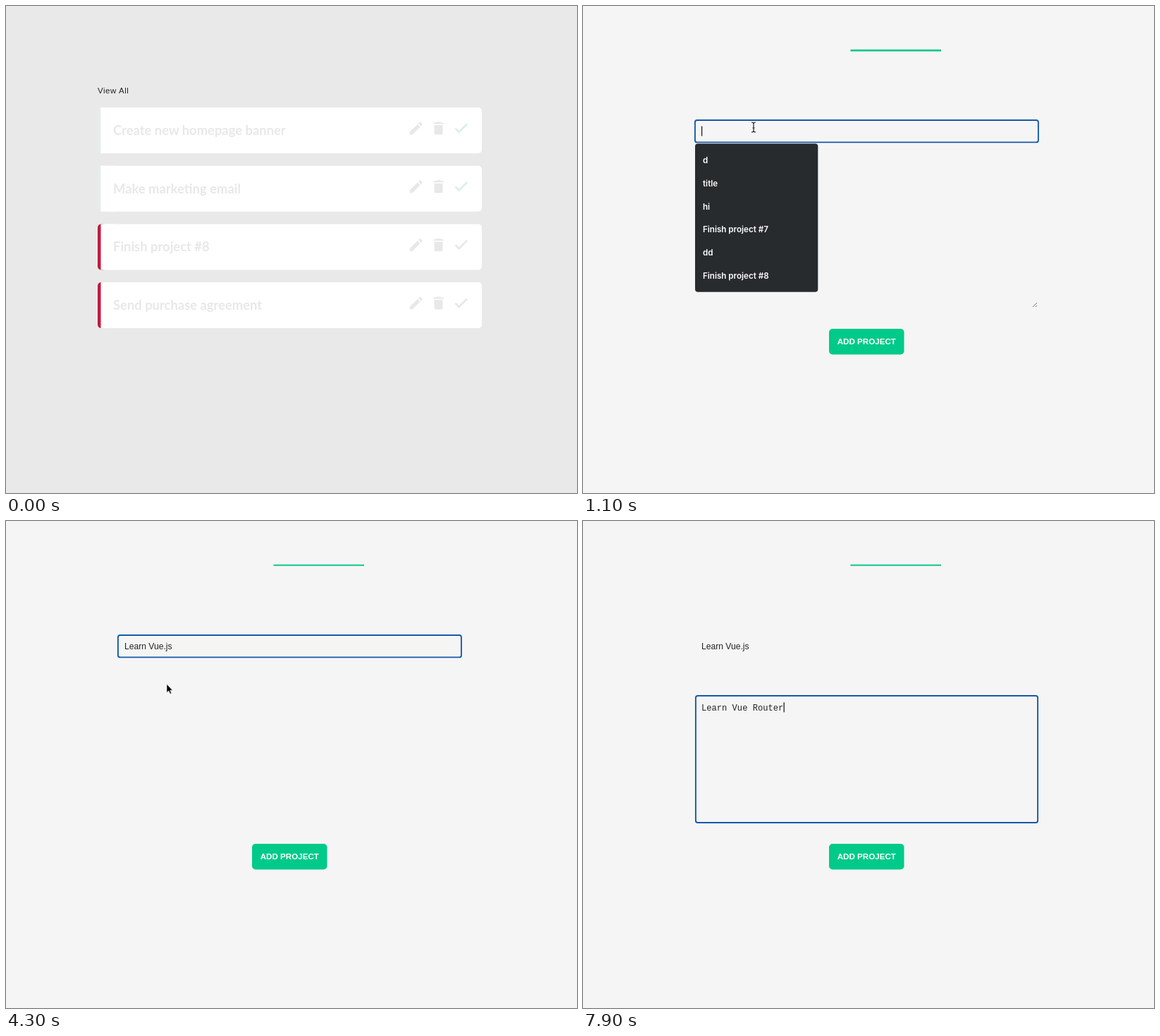
Animation, 810 px wide and 691 px high, one loop 8 s. Source, as an HTML page:

```html
<!DOCTYPE html>
<html lang="en">
<head>
<meta charset="utf-8">
<title>Project planner</title>
<style>
  html, body { margin: 0; width: 100%; height: 100%; overflow: hidden; background: #f5f5f5; }
  svg { display: block; width: 100vw; height: 100vh; }
  text { font-family: "Liberation Sans", Arial, sans-serif; white-space: pre; }
  .card { font: 700 18.4px Lato, sans-serif; fill: #e8e8e8; }
  .label { font-size: 10.9px; fill: #e2e2e2; }
  .option { font: 600 11.6px Inter, sans-serif; fill: #fff; }
  .button { font-size: 11.6px; font-weight: 700; fill: #fff; text-anchor: middle; }
  .field { font-size: 12.12px; fill: #222; }
  .mono { font-family: "Liberation Mono", "Courier New", monospace; }
  .ring { fill: none; stroke: #1559a8; stroke-width: 1.9; }
</style>
</head>
<body>
<svg id="stage" viewBox="0 0 810 691"></svg>
<script>
const LOOP = 8000, STEP = 100;
const stage = document.getElementById('stage');

const rect = (x, y, w, h, fill, r = 0, extra = '') =>
  `<rect x="${x}" y="${y}" width="${w}" height="${h}" rx="${r}" fill="${fill}" ${extra}/>`;
const text = (x, y, cls, str, extra = '') =>
  `<text x="${x}" y="${y}" class="${cls}" ${extra}>${str}</text>`;
const path = (d, x, y, fill, extra = '') =>
  `<path d="${d}" transform="translate(${x} ${y})" fill="${fill}" ${extra}/>`;
const clamp = v => Math.max(0, Math.min(1, v));
const ramp = (t, a, b) => clamp((t - a) / (b - a));
const mix = (a, b, k) => a + (b - a) * k;
const within = (t, a, b) => t >= a && t < b;

const PENCIL = 'M3 17.2V21h3.8L17.8 9.9l-3.7-3.7zM20.7 7a1 1 0 0 0 0-1.4l-2.3-2.3a1 1 0 0 0-1.4 0l-1.9 1.8 3.8 3.8z';
const BIN = 'M6 19c0 1.1.9 2 2 2h8c1.1 0 2-.9 2-2V7.5H6zM19 4h-3.5l-1-1h-5l-1 1H5v2h14z';
const CHECK = 'M9 16.2 4.8 12l-1.4 1.4L9 19 21 7l-1.4-1.4z';
const ARROW = 'M0 0V12L2.8 9.4 4.8 13.8 6.7 12.9 4.8 8.7H8.4z';
const HAND = 'M-3-7q2-1 3 1l1 3 5 1q2 1 1 4l-2 5h-6l-4-6 1-1 2 1z';
const BEAM = 'M-3-7Q0-7 0-5Q0-7 3-7M0-5V5M-3 7Q0 7 0 5Q0 7 3 7M-1.5 1H1.5';

const OPTIONS = ['d', 'title', 'hi', 'Finish project #7', 'dd', 'Finish project #8'];
const TASKS = ['Create new homepage banner', 'Make marketing email', 'Finish project #8', 'Send purchase agreement'];

const TITLE = {
  str: 'Learn Vue.js',
  keys: [1800, 1900, 2100, 2300, 2400, 2900, 3100, 3300, 3400, 3600, 3700, 3800]
};
const DETAILS = {
  str: 'Learn Vue Router',
  keys: [5700, 5900, 6000, 6100, 6300, 6400, 6600, 6700, 6800, 7000, 7300, 7400, 7500, 7700, 7800, 7900]
};
const typed = (field, t) => field.str.slice(0, field.keys.filter(k => k <= t).length);

const pen = document.createElement('canvas').getContext('2d');
function textEnd(str, font) {
  pen.font = font;
  return 168 + pen.measureText(str).width;
}

function taskCard(name, i) {
  const y = 144 + i * 82.7, done = i < 2;
  return rect(130, y, 12, 65, done ? '#e5eeeb' : '#c3193f', 5) +
    rect(140, y, 535, 65, '#fff', 5) + rect(134.5, y, 20, 65, '#fff') +
    text(152, y + 39, 'card', name) +
    path(PENCIL, 569.7, y + 17.5, '#e8e8e8') +
    path(BIN, 601.5, y + 17.5, '#e8e8e8') +
    path(CHECK, 633.6, y + 17.2, done ? '#dcefe8' : '#e8e8e8',
      `stroke="${done ? '#dcefe8' : '#e8e8e8'}" stroke-width="1"`);
}

const list = text(130, 123.5, 'field', 'View All', 'style="font-size:11.5px;letter-spacing:.55px"') +
  TASKS.map(taskCard).join('');

// White form card that fades into the page
const formCard = opacity => `<g opacity="${opacity}">` +
  rect(130, 108, 545, 416, '#fff', 8) +
  text(159, 149, 'label', 'TITLE:') + text(159, 234, 'label', 'DETAILS:') +
  rect(159, 192.3, 486.5, 1.2, '#e4e4e4') +
  rect(159.5, 247.5, 486, 181, 'none', 4, 'stroke="#e2e2e2"') +
  '<path d="M638 427l6-6M642 427l2-2" stroke="#ddd"/></g>';

const button = rect(349, 458, 106.5, 36.5, '#00ca89', 5) + text(402.3, 480.4, 'button', 'ADD PROJECT');

function dropdown(items) {
  return rect(159, 195.3, 174.3, 47 + (items.length - 1) * 32.7, '#282b2e', 4) +
    items.map((s, i) => text(170, 223.2 + i * 32.7, 'option', s)).join('');
}

const ring = (x, y, w, h) => rect(x, y, w, h, 'none', 3, 'class="ring"');
const caret = (x, y) => rect(x, y, 1.2, 14, '#111');

function titleField(t) {
  const str = typed(TITLE, t);
  let out = text(168, 181.8, 'field', str);
  if (within(t, 1000, 4700)) out += ring(158.9, 162, 487, 31.4);
  if (within(t, 1000, 4300)) out += caret(textEnd(str, '12.12px "Liberation Sans", Arial, sans-serif'), 170.5);
  if (within(t, 1000, 3800)) out += dropdown(str ? [TITLE.str] : OPTIONS);
  return out;
}

function detailsField(t) {
  if (t < 4700) return '';
  const str = typed(DETAILS, t);
  const blinkOff = within(t, 5100, 5600);
  return ring(159.9, 248, 485.2, 180) + text(168, 268.5, 'field mono', str) +
    (blinkOff ? '' : caret(168.2 + str.length * 7.273, 257.3));
}

function cursor(t) {
  let x, y;
  if (within(t, 100, 1800)) {
    const go = ramp(t, 500, 1000), k = go * go * (3 - 2 * go);
    x = mix(452, 242, k);
    y = t < 500 ? mix(8, 57, ramp(t, 100, 400)) : mix(57, 172, k);
  } else if (within(t, 4300, 5600)) {
    const k = ramp(t, 4300, 4700);
    x = mix(228, 226.5, k);
    y = mix(231.5, 269, k);
  } else return '';
  if (within(y, 162, 194) || y > 248)
    return path(BEAM, x, y, 'none', 'stroke="#222" stroke-width="1.2"');
  if (within(y, 45, 70))
    return path(HAND, x, y, '#fff', 'stroke="#111" stroke-width="1.1" stroke-dasharray="3 1.5"');
  return path(ARROW, x, y, '#000', 'stroke="#fff" stroke-width=".6"');
}

function form(t) {
  const fade = ramp(t, 500, 900);
  let out = fade < 1 ? formCard(1 - fade) : '';
  out += rect(379.5, 61.7, 128.5, within(t, 900, 1600) ? 2.7 : 2, '#0bc78a');
  if (within(t, 900, 1600))
    out += '<path d="M638 427l6-6M642 427l2-2" stroke="#777"/>';
  return out + button + detailsField(t) + titleField(t);
}

function draw(t) {
  const grey = Math.round(t < 400 ? 233 : mix(235, 245, ramp(t, 500, 900)));
  stage.innerHTML = rect(0, 0, 810, 691, `rgb(${grey},${grey},${grey})`) +
    (t < 400 ? list : form(t)) + cursor(t);
}

const start = performance.now();
let last = -1;
function tick() {
  const t = Math.floor((performance.now() - start) % LOOP / STEP) * STEP;
  if (t !== last) draw(last = t);
  requestAnimationFrame(tick);
}
tick();
</script>
</body>
</html>
```
